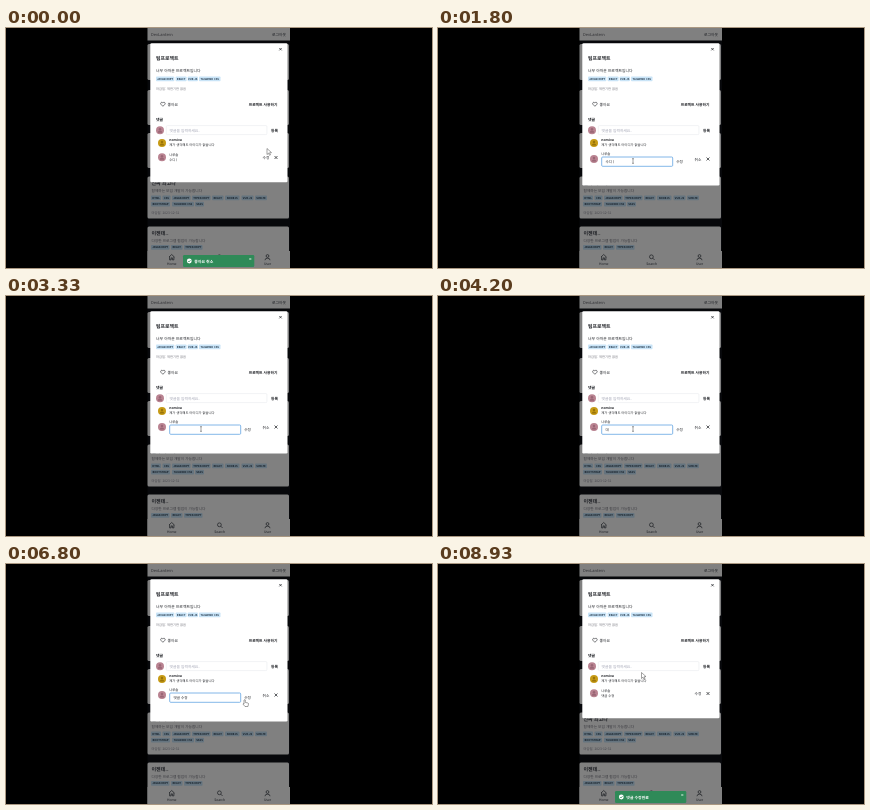
Animation, 426 px wide and 240 px high, one loop 8.99 s. Source, as an HTML page:

```html
<!DOCTYPE html>
<html lang="ko">
<head>
<meta charset="utf-8">
<style>
  html, body { margin: 0; width: 100%; height: 100%; overflow: hidden; background: #000; }
  svg { display: block; width: 100%; height: 100%; }
  text { font-family: "Noto Sans CJK KR", "Noto Sans CJK", "Noto Sans", sans-serif; text-rendering: geometricPrecision; }
</style>
</head>
<body>
<svg id="stage" viewBox="0 0 426 240"></svg>
<script>
const LOOP = 8990;
const GRAY = '#808080';
const INK = '#1b1d22';
const PINK = '#b98391';
const PINK_DARK = '#9a6675';
const stage = document.getElementById('stage');

function add(parent, tag, attrs, content) {
  const el = document.createElementNS('http://www.w3.org/2000/svg', tag);
  for (const key in attrs) el.setAttribute(key, attrs[key]);
  if (content) el.textContent = content;
  parent.appendChild(el);
  return el;
}
const group = (parent, attrs = {}) => add(parent, 'g', attrs);
const rect = (parent, x, y, width, height, fill, more) =>
  add(parent, 'rect', { x, y, width, height, fill, ...more });
const circle = (parent, cx, cy, r, fill, more) =>
  add(parent, 'circle', { cx, cy, r, fill, ...more });
const line = (parent, d, stroke = INK, width = 0.7) =>
  add(parent, 'path', { d, stroke, fill: 'none', 'stroke-width': width, 'stroke-linejoin': 'round' });
const text = (parent, x, y, content, size, fill = INK, weight = 400, more) =>
  add(parent, 'text', { x, y, 'font-size': size, fill, 'font-weight': weight, ...more }, content);
const cross = (parent, x, y, r, color) =>
  line(parent, `M${x - r} ${y - r}l${2 * r} ${2 * r}m0 ${-2 * r}l${-2 * r} ${2 * r}`, color);

// Each tag is [label, left edge, width].
function tags(parent, y, fill, color, list) {
  for (const [label, x, width] of list) {
    rect(parent, x, y, width, 4.8, fill, { rx: 0.8 });
    text(parent, x + width / 2, y + 3.45, label, 2.7, color, 700, { 'text-anchor': 'middle' });
  }
}
function avatar(parent, x, y, color, inner) {
  circle(parent, x, y, 4, color);
  circle(parent, x, y - 1, 1.2, inner);
  add(parent, 'path', { d: `M${x - 2.2} ${y + 2.6}a2.2 2.2 0 0 1 4.4 0z`, fill: inner });
}

// Dimmed page behind the dialog
const page = group(stage);
const dimTags = (y, list) => tags(page, y, '#65747f', '#15202a', list);
rect(page, 141.5, 0, 142.5, 240, '#07080b');
rect(page, 141.5, 0, 142.5, 12.5, GRAY);
text(page, 145, 7.7, 'DevLantern', 4, '#2c2c30');
text(page, 266, 7.9, '로그아웃', 3.8, INK, 500);
for (const [y, height] of [[16, 36], [62, 35], [105, 35], [148.5, 42], [198.5, 42]])
  rect(page, 141.5, y, 141.5, height, GRAY, { rx: 1.5 });
text(page, 145.5, 157, '진짜 최고다', 5, INK, 700);
text(page, 145.5, 164.3, '함께하는 모임 개발이 가능합니다', 3.7, '#3b3b40');
dimTags(167.5, [['HTML', 145, 10], ['CSS', 156.5, 8], ['JAVASCRIPT', 166, 18.5], ['TYPESCRIPT', 186, 18.5],
  ['REACT', 206, 11.5], ['NODEJS', 219, 14.5], ['VUE.JS', 235.5, 12], ['SVELTE', 249, 12]]);
dimTags(173.7, [['BOOTSTRAP', 145, 19], ['TAILWIND CSS', 166, 22], ['SASS', 189, 9]]);
text(page, 145.5, 185.5, '마감일: 2023-12-31', 3.3, '#45454c');
text(page, 145.5, 207, '이젠데..', 5, INK, 700);
text(page, 145.5, 214, '다양한 프로그램 협업이 가능합니다', 3.7, '#3b3b40');
dimTags(217, [['JAVASCRIPT', 145, 18.5], ['REACT', 165, 11.5], ['TYPESCRIPT', 178, 18.5]]);

// Bottom navigation
rect(page, 141.5, 223, 142.5, 17, GRAY);
line(page, 'M163 229l2.7-2.5 2.7 2.5M163.6 228.7v3.2h1.5v-2h1.3v2h1.5v-3.2');
circle(page, 213.4, 228.8, 1.9, 'none', { stroke: INK, 'stroke-width': 0.7 });
line(page, 'M214.8 230.2l1.8 1.8');
circle(page, 261.5, 228, 1.4, 'none', { stroke: INK, 'stroke-width': 0.7 });
line(page, 'M259 232.2q0-2 2.5-2t2.5 2');
for (const [label, x] of [['Home', 165.7], ['Search', 213.7], ['User', 261.5]])
  text(page, x, 236.8, label, 3.4, INK, 400, { 'text-anchor': 'middle' });

// Dialog
const dialog = group(stage);
const panel = rect(dialog, 144.3, 15.3, 137.2, 139, '#fff', { rx: 1.3 });
cross(dialog, 274.5, 21.2, 1.2);
text(dialog, 150, 31.7, '팀프로젝트', 4.9, INK, 700);
text(dialog, 150, 43.5, '너무 아까운 프로젝트입니다', 3.85, INK, 500);
tags(dialog, 48.5, '#c9e4f7', '#263c50',
  [['JAVASCRIPT', 150, 18.3], ['REACT', 169.6, 11], ['VUE.JS', 181.7, 10.2], ['TAILWIND CSS', 193, 21.5]]);
text(dialog, 150, 62.2, '마감일: 제한기한 없음', 3.3, '#7c7c84');
line(dialog, 'M156.9 78.3l-1.9-1.9c-1.2-1.4.9-3.1 1.9-1.4 1-1.7 3.1 0 1.9 1.4z', INK, 0.6);
text(dialog, 161.4, 77.5, '좋아요', 3.85, INK, 500);
text(dialog, 242.7, 77.5, '프로젝트 사용하기', 3.75, INK, 700);
text(dialog, 150, 93.3, '댓글', 3.9, INK, 700);
avatar(dialog, 154, 102.2, PINK, PINK_DARK);
rect(dialog, 160.3, 97.6, 100.6, 9, '#fff', { rx: 1, stroke: '#e5e7eb', 'stroke-width': 0.5 });
text(dialog, 163.6, 103.6, '댓글을 입력하세요..', 3.75, '#a2a4b4');
text(dialog, 265, 103.5, '등록', 3.8, INK, 700);
avatar(dialog, 156, 115, '#c79b16', '#9a7408');
text(dialog, 163.3, 113.3, 'nomivu', 3.4, INK, 700);
text(dialog, 163.3, 118.3, '제가 생각해도 아이디가 없습니다', 3.3);

// Own comment: reading view and editing view
const reading = group(dialog);
avatar(reading, 156, 129.2, PINK, PINK_DARK);
text(reading, 163.3, 128, '나루솔', 3.3);
const comment = text(reading, 163.3, 133.2, '', 3.3);
text(reading, 256.5, 130.8, '수정', 3.7, INK, 500);
cross(reading, 270, 129.5, 1.5);

const editing = group(dialog);
avatar(editing, 156, 131, PINK, PINK_DARK);
text(editing, 163.3, 127.3, '나루솔', 3.3);
const field = rect(editing, 163.7, 129, 71, 9.3, '#fff', { rx: 1 });
const draft = text(editing, 167.5, 135, '', 3.55);
text(editing, 238.2, 135.2, '수정', 3.7, INK, 500);
const cancel = text(editing, 256.5, 132.7, '취소', 3.7, INK, 500);
cross(editing, 270, 131, 1.5);

// Toast
const toast = group(stage);
rect(toast, 177, 227, 71.3, 12, '#2f8a58', { rx: 1.3 });
circle(toast, 183.3, 233, 2.4, '#fff');
line(toast, 'M182.1 233l.9 1 1.6-1.9', '#2f8a58');
const toastLabel = text(toast, 188.3, 234.5, '', 3.9, '#fff', 700);
cross(toast, 244.3, 231, 0.9, '#d8eee0');

// Pointers
const pointer = group(stage);
const outlined = d => add(pointer, 'path', { d, fill: '#fff', stroke: '#333', 'stroke-width': 0.45 });
const shapes = {
  arrow: outlined('M-1-2.5v6l1.5-1.3 1 2.1 1-.5-1-2 2-.2z'),
  hand: outlined('M-1-2.5q.7-.7 1.3 0v2.4l2.6.6q.8.3.6 1.2l-.6 2.3H0l-2-2.4q.1-.9 1 0z'),
  beam: line(pointer, 'M-1-2.3h2m-1 0v4.6m-1 0h2', '#444', 0.5)
};

// Pointer stops are [time, x, y]; typing steps are [time, content].
const PATH = [[0, 262, 123], [300, 260, 129], [600, 260, 129], [1100, 202, 129.5], [1500, 195, 133],
  [6200, 195, 133], [6700, 239, 138.5], [7150, 239, 138.5], [7800, 204.5, 111], [LOOP, 204.5, 111]];
const TYPING = [[0, '수디ㅣ'], [2000, ''], [4000, 'ㄷ'], [4150, '대'], [4450, '댓'], [4700, '댓ㄱ'], [4900, '댓그'],
  [5050, '댓글'], [5250, '댓글 '], [5350, '댓글 ㅅ'], [5480, '댓글 수'], [5700, '댓글 숮'], [5850, '댓글 수저'], [6000, '댓글 수정']];
const EDIT_START = 600, FOCUS = 1550, SAVE = 7150;

const clamp = v => Math.max(0, Math.min(1, v));
const smooth = v => v * v * (3 - 2 * v);
const show = (el, on) => el.setAttribute('visibility', on ? 'visible' : 'hidden');

function pointerAt(t) {
  const i = PATH.findIndex(p => p[0] > t);
  const [t0, x0, y0] = PATH[i - 1], [t1, x1, y1] = PATH[i];
  const k = smooth((t - t0) / (t1 - t0));
  return [x0 + (x1 - x0) * k, y0 + (y1 - y0) * k];
}

function draw(t) {
  const isEditing = t >= EDIT_START && t < SAVE;
  const focused = t >= FOCUS;
  show(reading, !isEditing);
  show(editing, isEditing);
  panel.setAttribute('height', isEditing ? 142.3 : 139);
  comment.textContent = t < SAVE ? '수디ㅣ' : '댓글 수정';
  draft.textContent = TYPING.filter(step => step[0] <= t).pop()[1];
  field.setAttribute('stroke', focused ? '#5a9fe0' : '#dfe3ea');
  field.setAttribute('stroke-width', focused ? 0.75 : 0.5);
  cancel.setAttribute('fill', t < 1300 ? '#3a4a9c' : INK);

  const visible = t < SAVE ? 1 - clamp((t - 650) / 200) : clamp((t - 7350) / 200);
  toast.setAttribute('opacity', visible);
  toast.setAttribute('transform', `translate(0 ${(1 - smooth(visible)) * 6})`);
  toastLabel.textContent = t < SAVE ? '좋아요 취소' : '댓글 수정완료';

  const [x, y] = pointerAt(t);
  const overField = isEditing && x < 235;
  const overButton = t > 200 && (t < 700 || (isEditing && x > 236 && t > 6000));
  const shape = overField ? 'beam' : overButton ? 'hand' : 'arrow';
  for (const name in shapes) show(shapes[name], name === shape);
  pointer.setAttribute('transform', `translate(${x} ${y})`);
}

function tick() {
  draw(performance.now() % LOOP);
  requestAnimationFrame(tick);
}
tick();
</script>
</body>
</html>
```
